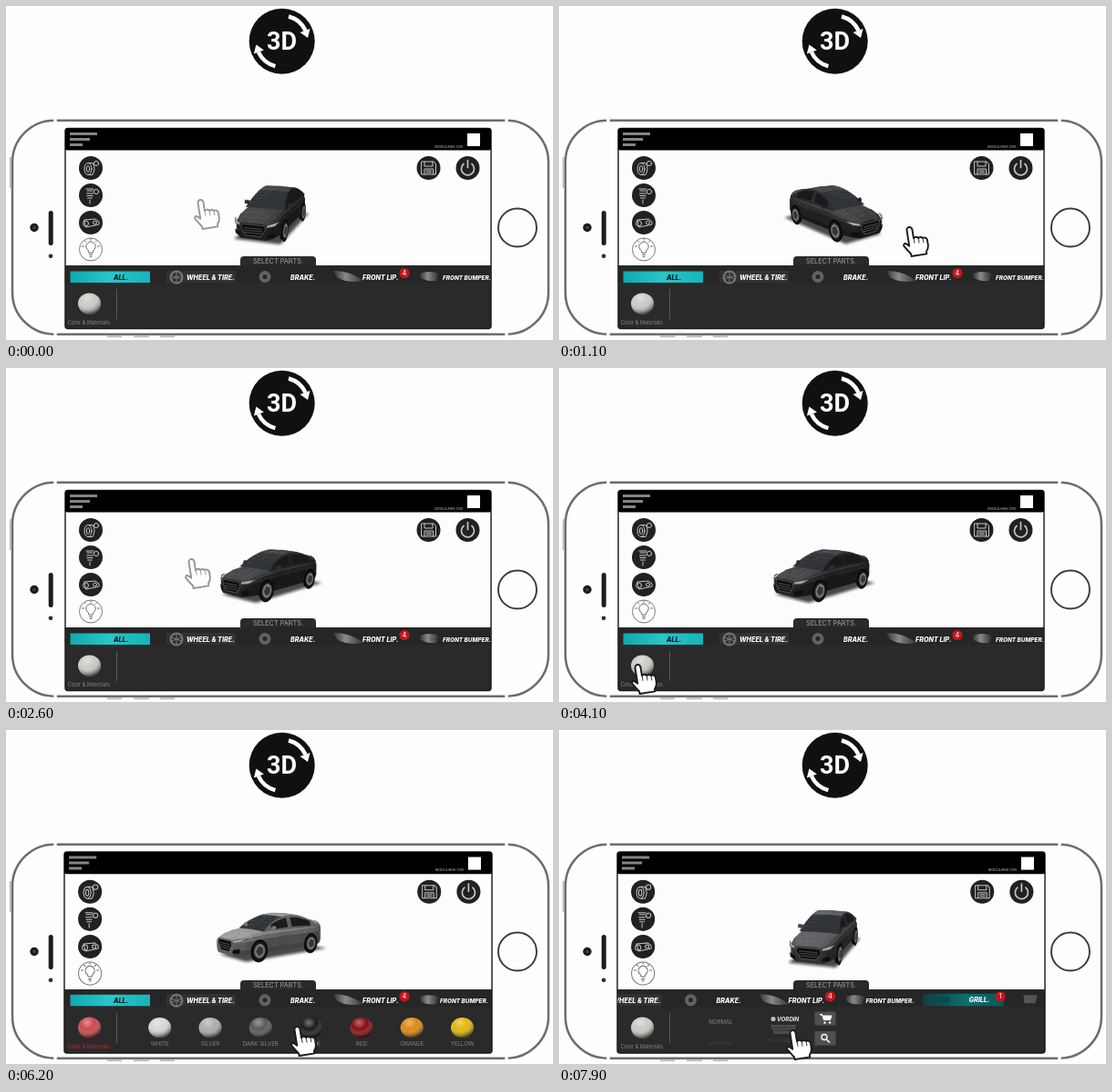
Recreate the animation shown at these times as an HTML page. Size 600x367 px, loop 8000 ms.

```html
<!DOCTYPE html>
<html lang="en">
<head>
<meta charset="utf-8">
<title>Car configurator</title>
<style>
html, body { margin: 0; width: 100%; height: 100%; overflow: hidden; background: #fefefe; }
svg { display: block; width: 600px; height: 367px; }
text { font-family: Inter, Roboto, sans-serif; }
.tab { font: italic 800 7.2px Inter, sans-serif; fill: #fff; }
.lab { font-size: 6.2px; fill: #858585; text-anchor: middle; }
.line { fill: none; stroke: #c4c4c4; stroke-width: 1; stroke-linecap: round; stroke-linejoin: round; }
.badge { font-size: 7.5px; fill: #fff; text-anchor: middle; }
</style>
</head>
<body>
<svg viewBox="0 0 600 367">
  <defs>
    <clipPath id="screenClip"><rect x="64.5" y="134" width="468" height="220.5" rx="3"/></clipPath>
    <filter id="soft" x="-30%" y="-50%" width="160%" height="200%"><feGaussianBlur stdDeviation="1.6"/></filter>
    <radialGradient id="gloss" cx=".4" cy=".25" r=".75">
      <stop offset="0" stop-color="#fff" stop-opacity=".4"/>
      <stop offset=".45" stop-color="#fff" stop-opacity="0"/>
      <stop offset="1" stop-color="#000" stop-opacity=".65"/>
    </radialGradient>
    <linearGradient id="teal">
      <stop offset="0" stop-color="#0fa9ae"/><stop offset=".5" stop-color="#28c6ca"/><stop offset="1" stop-color="#15b4b8"/>
    </linearGradient>
    <linearGradient id="tealDark">
      <stop offset="0" stop-color="#123f40"/><stop offset=".55" stop-color="#0d6f70"/><stop offset="1" stop-color="#0a5758"/>
    </linearGradient>
    <linearGradient id="lip">
      <stop offset="0" stop-color="#333"/><stop offset=".4" stop-color="#8a8a8a"/><stop offset="1" stop-color="#2c2c2c"/>
    </linearGradient>
  </defs>
  <rect width="600" height="367" fill="#fefefe"/>

  <!-- rotate badge -->
  <circle cx="302.7" cy="38.8" r="36" fill="#101012"/>
  <text x="302.5" y="48" text-anchor="middle" style="font:700 27px Roboto,sans-serif" fill="#fff">3D</text>
  <g id="arrow"><path d="M310 11.500A28.500 28.500 0 0 1 328.500 27" fill="none" stroke="#fff" stroke-width="4.500"/>
    <path d="M322.500 29L333.500 25L331 35Z" fill="#fff"/></g>
  <use href="#arrow" transform="rotate(180 302.7 38.8)"/>

  <!-- phone -->
  <g fill="none">
    <rect x="7" y="125.700" width="588" height="235" rx="46" stroke="#6c6c6c" stroke-width="2.500"/>
    <path d="M54 123v5M549 123v5M54 358v5M549 358v5" stroke="#fefefe" stroke-width="3.500"/>
    <path d="M111 363.300h16M140 363.300h17M169 363.300h16M4.800 166v34" stroke="#b0b0b0" stroke-width="1.500"/>
    <circle cx="561" cy="243.500" r="21" stroke="#3a3a3a" stroke-width="1.900"/>
  </g>
  <circle cx="31" cy="243.500" r="4.700" fill="#1b1b1f"/><circle cx="31" cy="243.500" r="1.500" fill="#4a4a58"/>
  <rect x="46.700" y="225" width="5" height="38" rx="2.500" fill="#1c1c1c"/>
  <circle cx="49" cy="274.800" r="2.400" fill="#333"/>

  <!-- app frame and icons -->
  <g id="frame">
    <rect x="65" y="134.500" width="467" height="220" rx="3" fill="#2a2a2b" stroke="#1c1c1c" stroke-width="1.500"/>
    <rect x="65.700" y="158" width="465.600" height="127" fill="#fdfdfd"/>
    <rect x="65" y="134.500" width="467" height="24" rx="2"/>
    <path d="M70 139h30v3h-30zM70 145h22v3h-22zM70 151h14v3h-14z" fill="#858585"/>
    <rect x="506" y="140" width="14" height="14" fill="#fff"/>
    <text x="501" y="155.500" text-anchor="end" style="font-size:3.700px" fill="#c8c8c8">MODULARIA CAR</text>
    <g fill="#212122">
      <circle cx="93" cy="178" r="13"/><circle cx="93" cy="208" r="13"/><circle cx="93" cy="238" r="13"/>
      <circle cx="463.500" cy="178" r="13"/><circle cx="506.500" cy="178" r="13"/>
    </g>
    <circle cx="93" cy="267.500" r="12.500" fill="#fff" stroke="#777"/>
    <g class="line">
      <ellipse cx="90" cy="179" rx="4" ry="6.500"/><ellipse cx="90" cy="179" rx="1.700" ry="3.500"/>
      <path d="M91 172.500h4q4 6 0 13h-4"/><circle cx="99" cy="173" r="2.600"/>
      <path d="M88 201h8M89 203h6M88.500 206h7M89 208.500h6M89.500 211h5M92 213v4"/><circle cx="99" cy="204" r="2.600"/>
      <path d="M86 235l12-1 4 3v3l-4 1-10 2z"/><circle cx="87.500" cy="239" r="3"/><circle cx="97.500" cy="238" r="2"/>
      <path d="M456 171h13l2.500 2.500V185H456zM459 171v5h9v-5M459 185v-6h9.500v6M461 181h5.500M461 183h5.500"/>
      <path d="M502 173.500a7 7 0 1 0 9 0M506.500 169.500v8" stroke-width="1.700"/>
      <path stroke="#666" d="M91 271q0-2-2-3.700a5 5 0 1 1 8 0q-2 1.700-2 3.700zM91.500 273.500h3M92 275.500h2M83.500 264h2M100.500 264h2M86.500 258l1.300 1.300M99.500 258l-1.300 1.300M93 255.800v1.500"/>
    </g>
  </g>

  <g id="car"></g>

  <path d="M257 286v-7q0-4 4-4h75q4 0 4 4v7z" fill="#2a2a2b"/>
  <text x="298.500" y="283" text-anchor="middle" style="font-size:7.300px" fill="#a5a5a5">SELECT PARTS.</text>

  <g clip-path="url(#screenClip)">
    <rect x="64.500" y="285" width="468" height="19" fill="#262627"/>
    <g id="tabs">
      <rect id="allTile" x="70.500" y="291.500" width="87.500" height="12.500" fill="url(#teal)"/>
      <text class="tab" id="allText" x="118" y="300.500">ALL.</text>
      <rect x="176" y="291" width="76" height="13" fill="#323233"/>
      <g class="line" style="stroke:#777"><circle cx="187" cy="298" r="6.500" stroke-width="2"/><path d="M187 292v12M181.500 296l11 4M192.500 296l-11 4"/>
        <circle cx="284" cy="297.500" r="4.500" style="stroke:#66605e;stroke-width:4"/></g>
      <path d="M359 291q16-1 34 11q-20 3-30-4z" fill="url(#lip)"/>
      <path d="M454 294q10-4 21 0l-3 8q-12 1-18-4z" fill="url(#lip)"/>
      <text class="tab" x="198" y="300.500">WHEEL &amp; TIRE.</text>
      <text class="tab" x="312" y="300.500">BRAKE.</text>
      <text class="tab" x="391" y="300.500">FRONT LIP.</text>
      <text class="tab" id="bumper" x="479" y="300.500" style="font-size:6.400px">FRONT BUMPER.</text>
      <circle cx="437" cy="293.500" r="5.600" fill="#c4161c"/><text class="badge" x="437" y="296.200">4</text>
      <rect x="539" y="290.500" width="88" height="13.500" fill="url(#tealDark)"/>
      <path d="M546 294h22v6h-22z" fill="#0c4a4b"/>
      <text class="tab" x="589" y="300">GRILL.</text>
      <circle cx="623.500" cy="293.500" r="5.600" fill="#c4161c"/><text class="badge" x="623.500" y="296.200">1</text>
      <path d="M649 292h15l-2 9h-12z" fill="#555"/>
    </g>
    <path d="M121.500 311v33" stroke="#5a5a5a"/>
    <g id="ball"></g>
    <text id="ballText" class="lab" x="91.500" y="349.500" style="font-size:5.700px">Color &amp; Materials.</text>
    <g id="swatches"></g>
    <g id="grill">
      <text class="lab" x="177.500" y="323">NORMAL</text>
      <text class="lab" x="177.500" y="346" style="font-size:4.500px;fill:#444">BASIC PART</text>
      <circle cx="235" cy="317.500" r="2.600" fill="#bbb"/>
      <text x="239" y="320" style="font:italic 800 6.200px Inter,sans-serif" fill="#d5d5d5">VORDIN</text>
      <path d="M232 324h28l-3 10h-21z" fill="#4d4d4d"/><path class="line" d="M235 327h22M236 330h20" style="stroke:#303030"/>
      <text class="lab" x="243" y="343" style="font-size:4.500px;fill:#444">SPORT GRILL</text>
      <path d="M280.500 309.500h23v15h-23zM280.500 331h23v15.500h-23z" fill="#505050"/>
      <path d="M286 312.500h2.500l2 6h7l1.500-4.500h-9.500z" fill="#fff" stroke="#fff"/>
      <circle cx="291.500" cy="321.500" r="1.200" fill="#fff"/><circle cx="297" cy="321.500" r="1.200" fill="#fff"/>
      <circle cx="291" cy="337.500" r="3" fill="none" stroke="#fff" stroke-width="1.300"/><path d="M293.500 340l3.500 3.500" stroke="#fff" stroke-width="1.600"/>
    </g>
  </g>

  <g id="hand"><g transform="rotate(-9)">
    <path d="M-3 3a3 3 0 0 1 6 0V13q2.800-2.500 5.200.4q2.800-1.700 4.800.8q3.200-.8 4.500 2.300V23q-.5 4-3 6.500V32H-2.500V29.500Q-5 26-9 19.500q.5-4 3.500-1.500L-3 20.500Z"
      fill="#fff" stroke="#1b1b1b" stroke-width="1.900" stroke-linejoin="round"/>
    <path d="M3.200 13v5.500M8.200 14v5M13 15v4.500" stroke="#444" fill="none" stroke-width="1.100"/>
  </g></g>
</svg>
<script>
const LOOP = 8000, STEP = 100, OPEN = 4300, CUT = 7800;
const el = id => document.getElementById(id);
const show = (id, on) => el(id).setAttribute('display', on ? 'inline' : 'none');
const ramp = (t, a, b) => {
  const u = Math.min(1, Math.max(0, (t - a) / (b - a)));
  return u * u * (3 - 2 * u);
};
const range = (n, f) => Array.from({ length: n }, (_, i) => f(i));
const centre = pts => [0, 1, 2].map(i => pts.reduce((s, p) => s + p[i], 0) / pts.length);

const ball = (x, color, ry) => [color, 'url(#gloss)']
  .map(f => `<ellipse cx="${x}" cy="327" rx="12.5" ry="${ry}" fill="${f}"/>`).join('');
const paints = { WHITE: '#d6d6d6', SILVER: '#acacac', 'DARK SILVER': '#56575a', BLACK: '#19191b',
  RED: '#870c10', ORANGE: '#dc870f', YELLOW: '#e2b50c' };
el('swatches').innerHTML = Object.entries(paints).map(([name, color], i) => {
  const x = 168.700 + i * 55.300;
  return ball(x, color, 11) + `<text class="lab" x="${x}" y="347">${name}</text>`;
}).join('');

// car model: x forward, y left, z up
const faces = [];
const add = (pts, tone, mid = [0, 0, .5], line) => faces.push({ pts, tone, mid, line });
const flip = pts => pts.map(([x, y, z]) => [x, -y, z]);
const both = (pts, ...rest) => { add(pts, ...rest); add(flip(pts), ...rest); };
const disc = (x, y, r, n = 20) => range(n, i => {
  const a = i * 2 * Math.PI / n;
  return [x + r * Math.cos(a), y, .3 + r * Math.sin(a)];
});
function loft(rings, tone, z) {
  rings.slice(1).forEach((next, i) => {
    const ring = rings[i], mid = [(ring[0][0] + next[0][0]) / 2.2, 0, z];
    for (let j = 0; j < ring.length - 1; j++) add([ring[j], ring[j + 1], next[j + 1], next[j]], tone(i, j), mid);
  });
}

const axles = [1.38, -1.38];
for (const x of axles) for (const y of [.8, -.8]) faces.push({ pts: disc(x, y, .33), tone: '#0c0c0d', always: true });

// hull: superellipse sections that narrow towards both ends
const bulge = v => Math.sign(v) * Math.abs(v) ** .55;
const hull = range(13, i => {
  const x = 2.3 * Math.cos(i * Math.PI / 12), w = .9 * (1 - .34 * Math.abs(x / 2.3) ** 8);
  const top = 1.04 - .03 * x - .25 * Math.max(0, x / 2.3) ** 4;
  return range(15, j => {
    const a = (-45 + j * 270 / 14) * Math.PI / 180, s = Math.sin(a);
    return [x, w * bulge(Math.cos(a)), .5 + (s > 0 ? top - .5 : .38) * bulge(s)];
  });
});
loft(hull, () => 'body', .55);
add(hull[0], 'body');
add(hull[12], 'body');

// cabin: an arched roof line, glass on the sides and both ends
const cabin = range(15, i => {
  const u = i / 14, arch = Math.sin(Math.PI * u) ** .8, x = 1.1 - 3 * u;
  const side = k => [x, .8 - .2 * k * arch, .95 + .5 * k * arch];
  const half = [0, .15, .84, 1].map(side);
  return [...half, [x, 0, .97 + .5 * arch], ...flip(half).reverse()];
});
loft(cabin, (i, j) => {
  const strip = Math.min(j, 7 - j);
  if (strip === 1) return i > 1 && i < 12 && i !== 6 ? '#17191b' : 'body';
  return strip === 3 && (i < 5 || i > 9) ? '#303438' : 'body';
}, .85);

for (const x of axles) {
  const rims = [[.39, '#08080a'], [.32, '#1c1c1e'], [.24, '#77797c'], [.17, '#333538']];
  rims.forEach(([r, tone], i) => both(disc(x, .9 + i * .008, r, i === 3 ? 5 : 20), tone, [x, 0, .3]));
}
both([[.72, .8, .98], [.72, 1.02, 1], [.66, 1.02, 1.11], [.68, .82, 1.1]], 'body', [0, .8, 1]);
const grille = [[2.32, .42, .68], [2.32, .47, .55], [2.32, .3, .3]];
add([...grille, ...flip(grille).reverse()], '#0d0d0e', undefined, '#8b8b8b');
for (const z of [.4, .48, .56]) add(range(2, i => [2.33, .36 - i * .72, z]), '#58595b', undefined, '#58595b');
both([[2.33, .5, .62], [2.19, .76, .66], [1.88, .87, .76], [2.14, .76, .76], [2.31, .52, .7]], '#a9adb2', undefined, '#222');
both([[2.31, .5, .27], [2.18, .74, .28], [2.17, .77, .42], [2.31, .54, .38]], '#0e0e10');

const cross = (a, b) => [0, 1, 2].map(k => a[(k + 1) % 3] * b[(k + 2) % 3] - a[(k + 2) % 3] * b[(k + 1) % 3]);
const dot = (a, b) => a.reduce((s, v, i) => s + v * b[i], 0);
const minus = (a, b) => a.map((v, i) => v - b[i]);

function drawCar(yaw, pitch, grey) {
  const r = Math.PI / 180, sa = Math.sin(yaw * r), ca = Math.cos(yaw * r), sp = Math.sin(pitch * r), cp = Math.cos(pitch * r);
  const cx = 296 + 5 * sa, cy = 227 - pitch * .2;
  const view = ([x, y, z]) => {
    const h = 1.08 * z - .7, q = x * ca - y * sa;
    return [x * sa + y * ca, h * cp - q * sp, q * cp + h * sp];
  };
  const outline = pts => pts.map(([x, y, d]) => {
    const k = 26.3 / (1 - d / 14);
    return (cx + x * k).toFixed(2) + ',' + (cy - y * k).toFixed(2);
  }).join(' ');
  const ground = [1, -1, -1, 1].map((s, i) => view([i < 2 ? 2 : -2.35, s * .92, 0]));
  let out = `<polygon points="${outline(ground)}" fill="#111" opacity=".75" filter="url(#soft)"/>`;
  for (const f of faces) {
    const pts = f.pts.map(view);
    let fill = f.tone;
    if (!f.always && pts.length > 2) {
      const c = centre(pts);
      let n = pts.reduce((s, p, i) => {
        const e = cross(minus(p, c), minus(pts[(i + 1) % pts.length], c));
        return s.map((v, k) => v + e[k]);
      }, [0, 0, 0]);
      const size = Math.hypot(...n) * (dot(n, minus(c, view(f.mid))) < 0 ? -1 : 1) || 1;
      n = n.map(v => v / size);
      if (dot(n, minus([0, 0, 14], c)) <= 0) continue;
      if (fill === 'body') {
        const lit = Math.max(0, dot(n, [-.25, .85, .45]));
        const v = Math.min(245, Math.round(grey * (.6 + .6 * lit) + 28 * lit ** 4));
        fill = `rgb(${v},${v},${v + 2})`;
      }
    }
    out += `<polygon points="${outline(pts)}" fill="${fill}" stroke="${f.line || fill}" stroke-width=".5"/>`;
  }
  el('car').innerHTML = out;
}

const greys = [40, 215, 165, 112, 42];

function draw(t) {
  const late = t >= CUT, open = t >= OPEN && !late;
  // a drag to the right and back, a trip to the panel, then one hop per swatch
  const right = ramp(t, 0, 840), left = ramp(t, 1200, 2600), go = ramp(t, 2700, 3600), turn = ramp(t, 4200, 4900);
  const hops = range(4, i => ramp(t, 5100 + i * 400, 5400 + i * 400)).reduce((a, b) => a + b);
  let x = 213 + 171 * right - 181 * left - 117 * go + 83 * turn + 50 * hops;
  let y = 213 + 30 * right - 33 * left + 116 * go;
  let yaw = -19 + 57 * right - 79 * left - 9 * turn, pitch = 15 - 4 * left - 3 * turn;
  let grey = greys[t < 5000 ? 0 : Math.min(4, 1 + Math.floor((t - 5000) / 450))];
  if (late) [x, y, yaw, pitch, grey] = [256, 330, -17, 14, 62];
  const fade = Math.max(1 - ramp(t, 0, 400), ramp(t, 2200, 2600) - ramp(t, 2700, 3000));
  el('hand').setAttribute('transform', `translate(${x} ${y})`);
  el('hand').setAttribute('opacity', 1 - .55 * fade);
  drawCar(yaw, pitch, grey);
  el('frame').setAttribute('transform', t < OPEN ? '' : 'translate(298.5 244) scale(1.0043) translate(-298.5 -244)');
  el('tabs').setAttribute('transform', `translate(${late ? -139.5 : 0} ${t < OPEN ? 0 : -.7})`);
  el('bumper').setAttribute('x', t < OPEN ? 479 : 476);
  el('ball').innerHTML = ball(91.500, open ? '#c8464a' : '#cbcac5', 11.600);
  el('ballText').style.fill = open ? '#c0262b' : '#858585';
  el('allText').style.fill = late ? '#fff' : '#0c1616';
  show('allTile', !late);
  show('swatches', open);
  show('grill', late);
}

const start = performance.now();
function tick(now) {
  const t = Math.max(0, now - start) % LOOP;
  draw(Math.floor(t / STEP) * STEP);
  requestAnimationFrame(tick);
}
draw(0);
requestAnimationFrame(tick);
</script>
</body>
</html>
```
